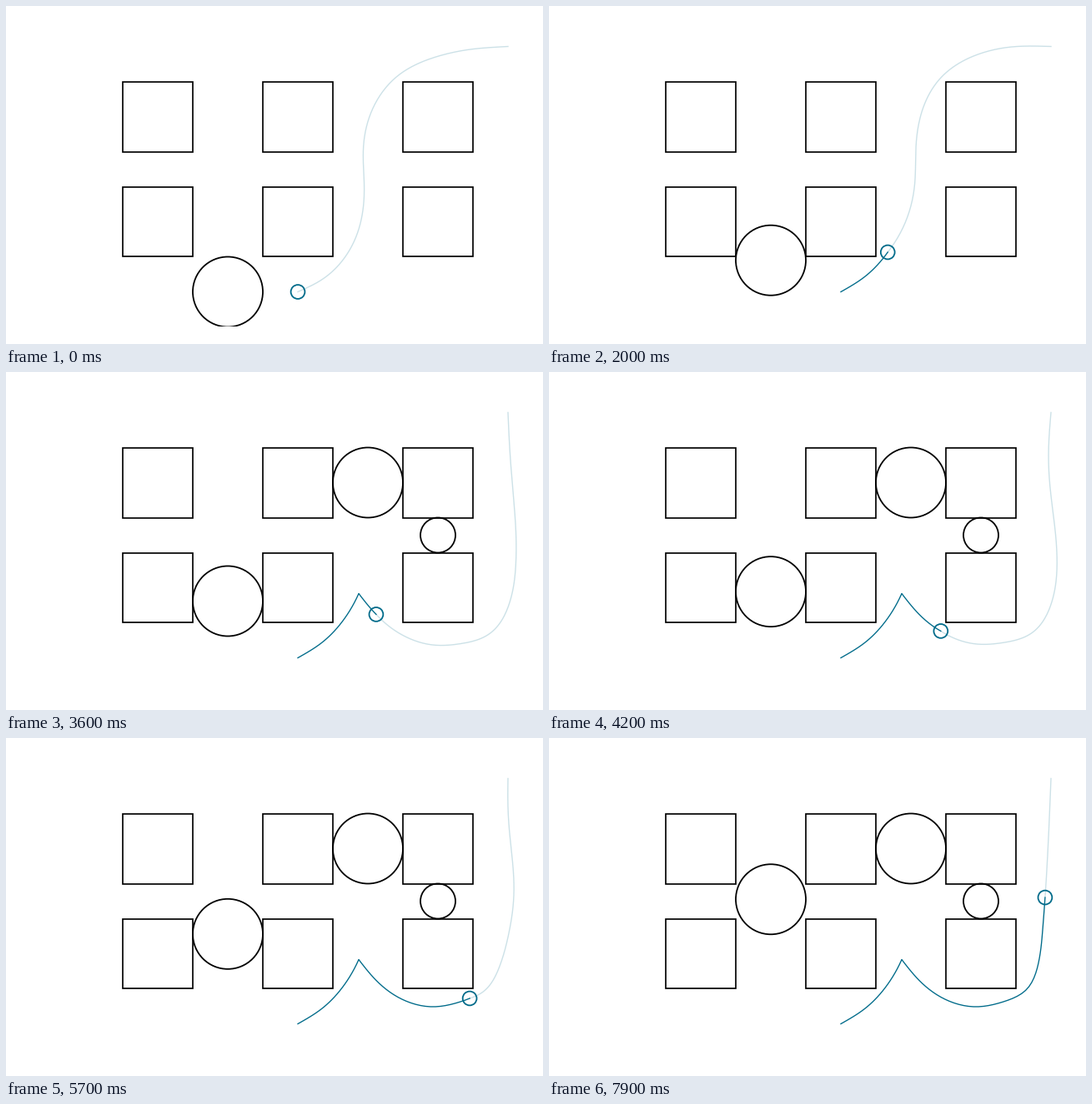
Recreate the animation shown at these times as a matplotlib script. Size 644 px wide and 405 px high, loop 8 s.

```python
import numpy as np
import matplotlib.pyplot as plt
from matplotlib.animation import FuncAnimation
from matplotlib.patches import Circle, Rectangle

W, H, DPI = 644, 405, 100
FRAMES, INTERVAL = 80, 100
UNIT = 42
START, TURN_AT, GOAL = (350, 342.5), (423, 265.5), (602, 48.5)
TURN = 26  # step at which new obstacles force a new route
TEAL = "#006b8a"


class Route:
    """Natural cubic spline through a few points, addressed by arc length."""

    def __init__(self, pts, samples=2000):
        pts = np.array(pts, float)
        t = np.r_[0, np.cumsum(np.hypot(*np.diff(pts, axis=0).T))]
        n, h = len(t), np.diff(t)[:, None]
        slope = np.diff(pts, axis=0) / h
        A, rhs = np.eye(n), np.zeros_like(pts)
        for k in range(1, n - 1):
            A[k, k - 1:k + 2] = h[k - 1, 0], 2 * (t[k + 1] - t[k - 1]), h[k, 0]
            rhs[k] = 6 * (slope[k] - slope[k - 1])
        m = np.linalg.solve(A, rhs)

        u = np.linspace(0, t[-1], samples)
        k = np.clip(np.searchsorted(t, u, side="right") - 1, 0, n - 2)
        d = (u - t[k])[:, None]
        b = slope[k] - h[k] * (2 * m[k] + m[k + 1]) / 6
        self.xy = pts[k] + d * (b + d * (m[k] / 2 + d * (m[k + 1] - m[k]) / (6 * h[k])))
        self.s = np.r_[0, np.cumsum(np.hypot(*np.diff(self.xy, axis=0).T))]

    def at(self, s):
        return np.column_stack([np.interp(s, self.s, c) for c in self.xy.T])

    def ahead(self, s0, waves, samples=160):
        """Rest of the route from s0, pushed sideways by a few sine waves."""
        p = self.at(np.linspace(s0, self.s[-1], samples))
        d = np.gradient(p, axis=0)
        normal = np.column_stack([-d[:, 1], d[:, 0]]) / np.hypot(*d.T)[:, None]
        u = np.linspace(0, np.pi, samples)
        push = sum(a * np.sin(k * u) for k, a in enumerate(waves, 1))
        return p + push[:, None] * normal


FIRST = Route([START, (378.5, 324.5), (402, 300.7), TURN_AT, (437, 215),
               (441, 165), (472, 85), (548, 48), GOAL])
SECOND = Route([TURN_AT, (444, 290.5), (470, 310.5), (510.5, 322), (545, 316),
                (572.5, 301.5), (587, 269.5), (592, 230), (595, 190), GOAL])

# How far the plan still deviates from the route: step -> sine amplitudes
FIRST_WAVES = {0: (-5, -1, 7), 11: (0, 0, 4.5), TURN: (0, 0, 0)}
SECOND_WAVES = {TURN: (26, -5, 1), 28: (21, -5.5, 1.5), 36: (16.4, -1.5, -3),
                49: (10, 9.5, -5), 54: (16, 2, -3), 65: (0, 0, 0)}


def waves_at(keys, i):
    return [np.interp(i, list(keys), amp) for amp in zip(*keys.values())]


def first_dist(i):
    return 2.264 * i + 0.0727 * i ** 2


def second_dist(i, speed=6.1, lag=5.6):
    """Start from rest and settle at a constant speed."""
    t = i - TURN
    return speed * (t - lag * (1 - np.exp(-t / lag)))


def plan(i):
    if i < TURN:
        return FIRST.ahead(first_dist(i), waves_at(FIRST_WAVES, i))
    return SECOND.ahead(second_dist(i), waves_at(SECOND_WAVES, i))


trail = np.vstack([FIRST.at(first_dist(np.arange(TURN))),
                   SECOND.at(second_dist(np.arange(TURN, FRAMES)))])


def px(width):
    return width * 72 / DPI


fig = plt.figure(figsize=(W / 100, H / 100), dpi=DPI, facecolor="white")
ax = fig.add_axes([0, 0, 1, 1])
ax.set_xlim(0, W)
ax.set_ylim(H, 0)
ax.axis("off")


def outline(patch, color="black", width=1.8):
    patch.set(fill=False, edgecolor=color, linewidth=px(width))
    return ax.add_patch(patch)


for x in (140, 308, 476):
    for y, h in ((91, 84), (217, 83)):
        outline(Rectangle((x, y), 2 * UNIT, h), width=1.7)

blockers = [outline(Circle((434, 132.5), UNIT)),
            outline(Circle((518, 195.5), UNIT / 2))]
mover = outline(Circle((266, START[1]), UNIT))
mover.set_clip_path(Rectangle((0, 0), W, 384, transform=ax.transData))

ahead, = ax.plot([], [], color=TEAL, alpha=0.2, lw=px(1.4), zorder=3)
behind, = ax.plot([], [], color=TEAL, lw=px(1.35), zorder=4)
robot = outline(Circle(START, 8.4), TEAL)
robot.set_zorder(5)


def draw(i):
    mover.center = 266, START[1] - 1.889 * i
    for b in blockers:
        b.set_visible(i >= TURN)
    ahead.set_data(*plan(i).T)
    behind.set_data(*trail[:i + 1].T)
    robot.center = tuple(trail[i])
    return [mover, *blockers, ahead, behind, robot]


anim = FuncAnimation(fig, draw, frames=FRAMES, interval=INTERVAL, repeat=True)
plt.show()
```
